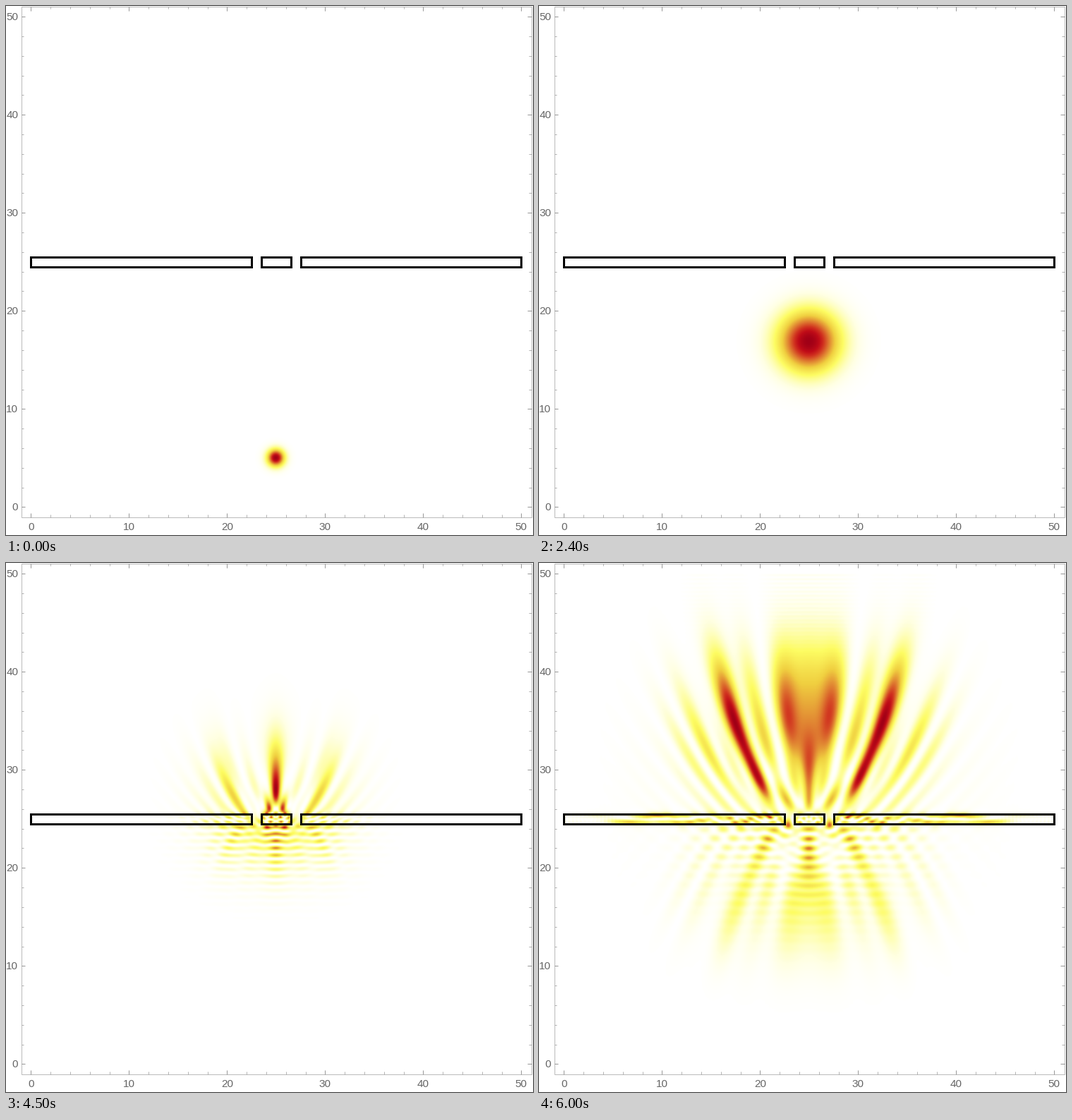
These frames come from a looping animation (747x750 px, 6.1 s). A matplotlib script:

```python
import numpy as np
import matplotlib.pyplot as plt
from matplotlib.animation import FuncAnimation
from matplotlib.collections import LineCollection
from matplotlib.colors import LinearSegmentedColormap
from matplotlib.patches import Rectangle

W, H, DPI = 747, 750, 64
PT = 72 / DPI            # points per pixel
FRAMES, INTERVAL = 61, 100

# wave packet and double slit, in plot units
SIZE, STEP = 50, 0.1
MID = SIZE / 2
START_Y, MOMENTUM, WIDTH2 = 5, 4.95, 0.72
DEPTH = -20.0
SUBSTEPS = 30
DT = 0.1 / SUBSTEPS
WALLS = [(0, 22.5), (23.5, 26.5), (27.5, 50)]
WALL_Y = (24.5, 25.5)


def px(u):
    return 35.3 + 13.9 * u


def py(v):
    return 710.3 - 13.9 * v


# The field is even about the middle, so only the right half is computed.
n = int(SIZE / STEP)
y = (np.arange(n) + 0.5)[:, None] * STEP
s = (np.arange(n // 2) + 0.5)[None, :] * STEP
wall = (np.abs(y - MID) < 0.5) & (np.abs(s - 2) > 0.5)
onsite = (np.where(wall, DEPTH, 0) + 60 / (24 * STEP**2)).astype(np.float32)


def energy(a):
    """Hamiltonian with a fourth-order Laplacian; two ghost cells per side."""
    a[:, 1] = a[:, 2]
    a[:, 0] = a[:, 3]
    mid = slice(2, -2)
    near = a[1:-3, mid] + a[3:-1, mid]
    near += a[mid, 1:-3]
    near += a[mid, 3:-1]
    near *= -16
    near += a[:-4, mid]
    near += a[4:, mid]
    near += a[mid, :-4]
    near += a[mid, 4:]
    near *= 1 / (24 * STEP**2)
    near += onsite * a[mid, mid]
    return near


def simulate():
    """Staggered leapfrog for the real and imaginary parts."""
    envelope = np.exp(-(s**2 + (y - START_Y)**2) / (2 * WIDTH2))
    psi = envelope * np.exp(1j * MOMENTUM * (y - START_Y))
    re = np.pad(psi.real, 2).astype(np.float32)
    im = np.pad(psi.imag, 2).astype(np.float32)
    r, i = re[2:-2, 2:-2], im[2:-2, 2:-2]
    out = [r**2 + i**2]
    i -= DT / 2 * energy(re)
    for _ in range(FRAMES - 1):
        for _ in range(SUBSTEPS):
            r += DT * energy(im)
            old = i.copy()
            i -= DT * energy(re)
        out.append(r**2 + old * i)
    return out


def picture(k):
    d = fields[k] / fields[k].max()
    return np.hstack([d[:, ::-1], d])


fields = simulate()

heat = LinearSegmentedColormap.from_list("heat", [
    (0.00, "#ffffff"), (0.06, "#ffffe0"), (0.25, "#fdfc62"),
    (0.44, "#f0cf40"), (0.63, "#de7830"), (0.78, "#d0301f"),
    (0.88, "#c00c18"), (1.00, "#a00016")], N=512)

fig = plt.figure(figsize=(W / DPI, H / DPI), dpi=DPI, facecolor="white")
ax = fig.add_axes([0, 0, 1, 1])
image = ax.imshow(picture(0), cmap=heat, vmin=0, vmax=1, origin="lower",
                  extent=(px(0), px(SIZE), py(0), py(SIZE)),
                  interpolation="bilinear", aspect="auto")
ax.set_xlim(0, W)
ax.set_ylim(H, 0)
ax.axis("off")

# frame and ticks
left, right, top, bottom = 21.5, 744.5, 1.0, 724.5
ax.add_patch(Rectangle((left, top), right - left, bottom - top, fill=False,
                       ec="#b4b4b4", lw=0.9 * PT))
major, minor = [], []
for u in range(0, SIZE + 1, 2):
    group, size = (major, 5.5) if u % 10 == 0 else (minor, 3.3)
    x0, y0 = px(u), py(u)
    group += [[(x0, bottom), (x0, bottom - size)], [(x0, top), (x0, top + size)],
              [(left, y0), (left + size, y0)], [(right, y0), (right - size, y0)]]
ax.add_collection(LineCollection(major, colors="#8c8c8c", linewidths=0.9 * PT))
ax.add_collection(LineCollection(minor, colors="#a0a0a0", linewidths=0.8 * PT))

font = dict(family="Liberation Sans", size=15.3 * PT, color="#666666",
            va="baseline")
for u in range(0, SIZE + 1, 10):
    ax.text(px(u), 743.3, str(u), ha="center", **font)
    ax.text(17.2, py(u) + 4.5, str(u), ha="right", **font)

for a, b in WALLS:
    ax.add_patch(Rectangle((px(a), py(WALL_Y[1])), px(b) - px(a),
                           py(WALL_Y[0]) - py(WALL_Y[1]), fill=False,
                           ec="black", lw=3 * PT, joinstyle="miter", zorder=3))


def update(k):
    image.set_data(picture(k))
    return image,


anim = FuncAnimation(fig, update, frames=FRAMES, interval=INTERVAL,
                     repeat=True, repeat_delay=0)
plt.show()
```
